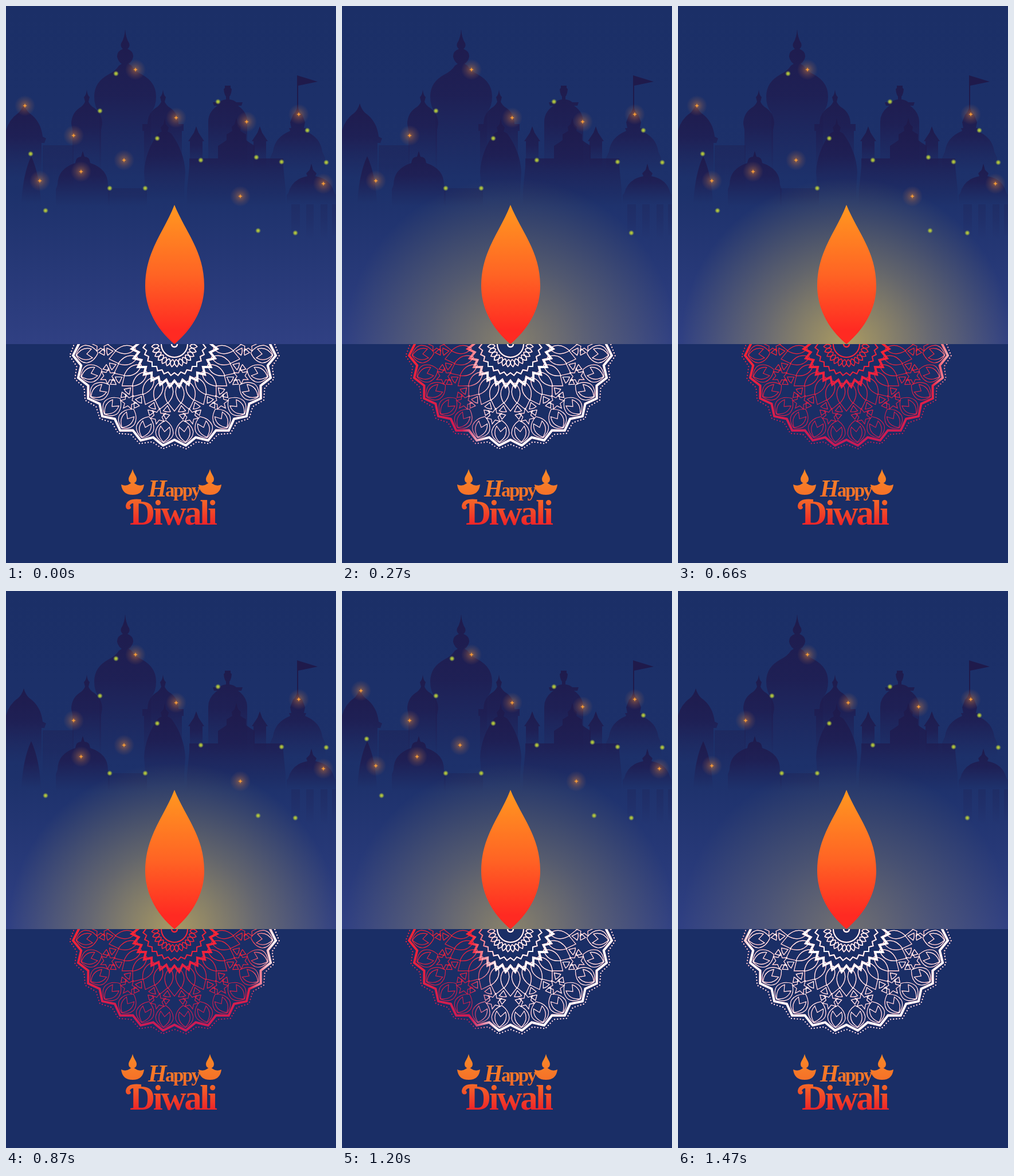
An HTML page that plays this animation: 576 by 972 pixels, repeating every 1.5 s.

```html
<!DOCTYPE html>
<html lang="en">
<head>
<meta charset="utf-8">
<title>Happy Diwali</title>
<style>
  html, body { margin: 0; width: 100%; height: 100%; overflow: hidden; background: #1a2e66; }
  svg { display: block; width: 576px; height: 972px; }
  text { font-family: "Liberation Serif", serif; font-weight: bold; }
</style>
</head>
<body>
<svg viewBox="0 0 576 972">
  <defs>
    <linearGradient id="sky" x2="0" y2="1">
      <stop stop-color="#1b2f67"/><stop offset=".55" stop-color="#1d316b"/><stop offset="1" stop-color="#304083"/>
    </linearGradient>
    <linearGradient id="shade" x2="0" y2="1">
      <stop stop-color="#1f1a4b" stop-opacity=".95"/>
      <stop offset=".45" stop-color="#1f1c50" stop-opacity=".8"/>
      <stop offset="1" stop-color="#1f2258" stop-opacity="0"/>
    </linearGradient>
    <linearGradient id="fire" x2="0" y2="1">
      <stop stop-color="#ff9820"/><stop offset=".5" stop-color="#ff6424"/><stop offset=".9" stop-color="#ff2a22"/>
    </linearGradient>
    <linearGradient id="logo" gradientUnits="userSpaceOnUse" x1="0" y1="808" x2="0" y2="905">
      <stop stop-color="#f98a28"/><stop offset=".5" stop-color="#f56f28"/><stop offset="1" stop-color="#ee2428"/>
    </linearGradient>
    <linearGradient id="red" gradientUnits="userSpaceOnUse" x1="0" y1="590" x2="0" y2="770">
      <stop stop-color="#fb2534"/><stop offset="1" stop-color="#c71a58"/>
    </linearGradient>
    <linearGradient id="white" gradientUnits="userSpaceOnUse">
      <stop stop-color="#fff" stop-opacity="0"/><stop offset="1" stop-color="#fff"/>
    </linearGradient>
    <radialGradient id="halo" gradientUnits="userSpaceOnUse" cx="294" cy="590" r="290">
      <stop stop-color="#f2cf4d"/><stop offset=".5" stop-color="#f2cf4d" stop-opacity=".46"/>
      <stop offset="1" stop-color="#f2cf4d" stop-opacity="0"/>
    </radialGradient>
    <radialGradient id="ember">
      <stop stop-color="#f0973c" stop-opacity=".7"/><stop offset=".2" stop-color="#d9803c" stop-opacity=".4"/>
      <stop offset=".6" stop-color="#b06a48" stop-opacity=".2"/><stop offset="1" stop-color="#b06a48" stop-opacity="0"/>
    </radialGradient>
    <radialGradient id="firefly">
      <stop stop-color="#c9d93c"/><stop offset=".45" stop-color="#a9bf3c" stop-opacity=".85"/>
      <stop offset="1" stop-color="#8aa048" stop-opacity="0"/>
    </radialGradient>
    <clipPath id="floor"><path d="M0 590H576V972H0Z"/></clipPath>
    <g id="mandala" fill="none"></g>
    <g id="lamp">
      <path d="M0 808C-2 817-7 820-7 826A7 7 0 0 0 7 826C7 820 2 817 0 808Z"/>
      <path d="M-20 835Q-12 839-5 834Q0 829 5 834Q12 839 20 835Q18 853 0 853Q-18 853-20 835Z"/>
    </g>
  </defs>

  <path fill="url(#sky)" d="M0 0H576V590H0Z"/>
  <g id="city" fill="url(#shade)">
    <path d="M64 243H118V325H64Z" opacity=".35"/>
    <path d="M178 318H246V350H178Z" opacity=".3"/>
    <path d="M498 346H513V408H498ZM524 346H537V405H524ZM549 346H561V405H549ZM569 346H576V400H569Z" opacity=".22"/>
    <path fill="#1f1a4b" d="M508 121L544 132L510 139V190H508Z"/>
  </g>
  <path id="glow" fill="url(#halo)" d="M0 290H576V590H0Z"/>
  <g id="lights"></g>
  <path fill="url(#fire)" d="M294 347C276 394 243 428 243 488C243 534 268 568 294 590C320 568 346 534 346 488C346 428 313 394 294 347Z"/>

  <g clip-path="url(#floor)">
    <use href="#mandala" stroke="url(#red)"/>
    <use href="#mandala" stroke="url(#white)"/>
  </g>

  <g fill="url(#logo)">
    <use href="#lamp" x="221"/>
    <use href="#lamp" x="356"/>
    <text x="248" y="856" font-size="33" letter-spacing="-2.6"><tspan font-size="42" font-style="italic">H</tspan>appy</text>
    <text x="216" y="905" font-size="61" letter-spacing="-3.3">Diwali</text>
    <path d="M236 861Q211 858 209 872Q209 880 216 878Q220 875 216 872Q218 865 236 866Z"/>
  </g>
</svg>
<script>
const LOOP = 1500, STEP = 30;
const $ = id => document.getElementById(id);
const add = (id, markup) => $(id).insertAdjacentHTML("beforeend", markup);

// Temples: axis, top, and the right half of the outline, mirrored about the axis.
const temples = [
  [208, 40, "Q1 56 7 65Q9 71 4 75Q15 79 14 89Q12 97 6 101L11 104Q16 113 30 120Q54 133 54 158Q54 176 45 186V300H0Z"],
  [141, 146, "Q1 156 5 159L3 167Q6 174 13 178Q27 188 27 206L25 216V290H0Z"],
  [274, 146, "Q1 156 5 159L3 167Q6 174 13 178Q27 188 27 206H36V218H33V290H0Z"],
  [31, 170, "Q3 181 10 187Q30 201 33 228L39 231L36 239H31V300H0Z"],
  [332, 210, "L4 221L14 236H11V285H0Z"],
  [443, 210, "L4 221L14 236H11V285H0Z"],
  [387, 139, "H5V143L7 145Q6 155 3 158V163Q11 164 15 168H26L24 174H18Q34 185 34 202V290H0Z"],
  [509, 174, "Q2 185 8 190L13 203L11 213H15L13 218Q40 229 43 254L48 265V290H0Z"],
  [44, 262, "Q15 295 17 345H0Z"],
  [134, 253, "L3 263Q12 263 13 274Q44 284 44 312L47 320V350H0Z"],
  [277, 195, "L2 206L7 212L5 219L11 222Q34 253 36 290L34 320V340H0Z"],
  [402, 195, "L3 206L8 211L7 218L17 224V234L24 239L32 244V266H82V280L86 320V350H0Z"],
  [533, 275, "L3 286L9 292L7 297Q34 302 40 326L43 330V346H0Z"]
];
for (const [x, top, outline] of temples)
  for (const side of [1, -1])
    add("city", `<path transform="translate(${x})scale(${side} 1)" d="M0 ${top}${outline}"/>`);

// Mandala: polar points, angle counted in 28ths of a turn from straight down.
const SECTORS = 28;
const at = (r, a) => {
  const angle = a * 2 * Math.PI / SECTORS;
  return `${(294 + r * Math.sin(angle)).toFixed(1)} ${(590 + r * Math.cos(angle)).toFixed(1)} `;
};
const line = (d, width, extra = "") => add("mandala", `<path d="${d}" stroke-width="${width}" ${extra}/>`);
const around = motif => Array.from({ length: 16 }, (_, i) => motif(i - 7.5)).join("");
const zigzag = (tip, valley) =>
  "M" + Array.from({ length: 33 }, (_, i) => at(i % 2 ? tip : valley, (i - 16) / 2)).join("L");
const leaf = (r0, r1, spread, a) => {
  const mid = (r0 + r1) / 2;
  return `M${at(r0, a)}Q${at(mid, a - spread)}${at(r1, a)}Q${at(mid, a + spread)}${at(r0, a)}`;
};
const ring = r => `M${294 - r} 590a${r} ${r} 0 0 0 ${2 * r} 0`;

line(zigzag(178, 167), 4);
line(zigzag(184, 175), 2.2, 'stroke-dasharray="0 5.2" stroke-linecap="round"');
line(around(a =>
  `M${at(134, a)}Q${at(143, a - .45)}${at(156, a - .44)}Q${at(167, a - .4)}${at(173, a)}` +
  `Q${at(167, a + .4)}${at(156, a + .44)}Q${at(143, a + .45)}${at(134, a)}` +
  `M${at(172, a)}Q${at(161, a - .4)}${at(145, a - .24)}L${at(154, a)}L${at(145, a + .24)}Q${at(161, a + .4)}${at(172, a)}`), 1.1);
line(around(a =>
  `M${at(108, a)}L${at(118, a - .24)}Q${at(120, a)}${at(118, a + .24)}Z` +
  `M${at(132, a)}L${at(124, a - .2)}Q${at(122, a)}${at(124, a + .2)}Z`), 1.2);
for (let k = -7; k < 8; k += 2) {
  const star = Array.from({ length: 12 }, (_, i) => {
    const size = i % 2 ? 7 : 14, turn = i * Math.PI / 6, r = 129 + size * Math.cos(turn);
    return at(r, k + size * Math.sin(turn) / r * SECTORS / 2 / Math.PI);
  });
  line("M" + star.join("L") + "Z", 1.1);
}
line(zigzag(103, 117), 1.1);
line(around(a => leaf(68, 104, .75, a)), 1.2);
line(zigzag(75, 64), 4);
line(zigzag(55, 50), 2);
line(around(a => leaf(27, 40, .95, a)), 1.5);
line(ring(23), 2);
line(ring(5), 2.5);

// Lights: x, y and the letters of the blink groups they belong to.
const embers = [[33, 174, "AD"], [226, 111, "C"], [297, 195, "B"], [420, 202, "AB"], [511, 189, ""],
  [118, 226, "B"], [206, 269, "D"], [131, 289, "D"], [59, 305, "AC"], [554, 310, "D"], [409, 332, "D"]];
const fireflies = [[192, 118, "D"], [164, 183, "B"], [370, 167, ""], [264, 231, ""], [43, 258, "AD"],
  [526, 217, "AC"], [559, 273, ""], [340, 269, "C"], [437, 264, "AD"], [481, 272, "C"],
  [181, 318, "B"], [243, 318, ""], [69, 357, "D"], [440, 392, "D"], [505, 396, "C"]];
const blinks = [["A", 90, 150], ["D", 240, 300], ["C", 480, 540], ["B", 630, 690],
  ["A", 840, 900], ["C", 1050, 1110], ["D", 1440, 1500]];
const light = (x, y, groups, body) =>
  add("lights", `<g data-groups="${groups}" transform="translate(${x} ${y})">${body}</g>`);
for (const e of embers)
  light(...e, '<circle r="18" fill="url(#ember)"/><path d="M0-4L1-1L4 0L1 1L0 4L-1 1L-4 0L-1-1Z" fill="#f39a3a"/>');
for (const f of fireflies)
  light(...f, '<circle r="5" fill="url(#firefly)"/>');

function draw(now) {
  const t = Math.floor(now % LOOP / STEP) * STEP;
  const u = 1 - Math.abs(t / (LOOP / 2) - 1);
  const edge = t ? 90 + 370 * u + 65 * u * u : 60;
  $("white").setAttribute("x1", edge - 22);
  $("white").setAttribute("x2", edge + 22);
  $("glow").setAttribute("opacity", t ? .32 + .36 * u : 0);
  const off = blinks.filter(([, from, to]) => t >= from && t < to).map(b => b[0]);
  for (const g of $("lights").children)
    g.style.display = off.some(name => g.dataset.groups.includes(name)) ? "none" : "";
}
const start = performance.now();
(function frame() {
  draw(performance.now() - start);
  requestAnimationFrame(frame);
})();
</script>
</body>
</html>
```
